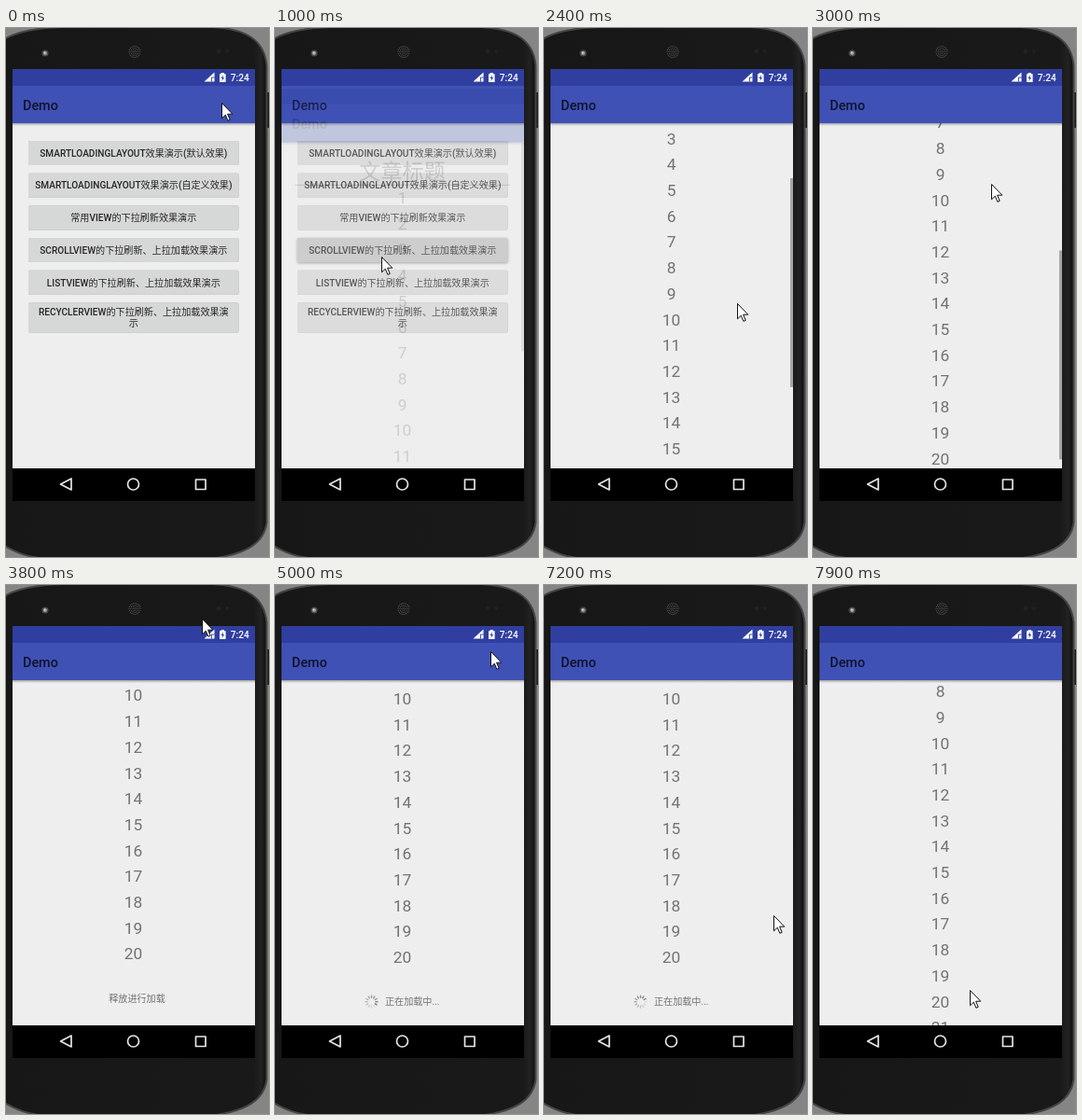
Recreate the animation shown at these times as an HTML page. Size 282 by 567 pixels, loop 8 s.

```html
<!DOCTYPE html>
<html lang="zh-CN">
<head>
<meta charset="utf-8">
<title>Demo</title>
<style>
html, body { margin: 0; width: 100%; height: 100%; overflow: hidden; background: #858585; }
svg { display: block; width: 282px; height: 567px; }
text { font-family: Roboto, "Noto Sans CJK SC", "Noto Sans CJK", sans-serif; }
.mid { text-anchor: middle; }
.title { font-size: 14.4px; font-weight: 500; fill: #10132c; }
.button rect { fill: #d6d7d7; filter: drop-shadow(0 .8px .7px rgba(0,0,0,.32)); }
.button text { font-size: 10.1px; font-weight: 500; fill: #262626; }
.button.pressed rect { fill: #c2c3c3; filter: drop-shadow(0 1.8px 1.4px rgba(0,0,0,.4)); }
#rows text { font-size: 17.33px; fill: #727272; }
#footer text { font-size: 10.1px; fill: #727272; }
#heading { font-size: 23.1px; fill: #727272; }
.nav { fill: none; stroke: #e6e6e6; stroke-width: 1.7; stroke-linejoin: round; }
</style>
</head>
<body>
<svg viewBox="0 0 282 567">
  <defs>
    <linearGradient id="shade" x2="0" y2="1">
      <stop offset="0" stop-opacity=".32"/><stop offset="1" stop-opacity="0"/>
    </linearGradient>
    <linearGradient id="body">
      <stop offset="0" stop-color="#171717"/><stop offset=".95" stop-color="#191919"/>
      <stop offset=".98" stop-color="#222"/><stop offset="1" stop-color="#0c0c0c"/>
    </linearGradient>
    <clipPath id="screen"><rect x="7" y="44" width="260" height="428"/></clipPath>
    <clipPath id="view"><rect x="7" y="102" width="260" height="370"/></clipPath>
    <g id="bars">
      <rect x="7" y="44" width="260" height="428" fill="#eee"/>
      <rect x="7" y="44" width="260" height="18" fill="#303f9f"/>
      <rect x="7" y="62" width="260" height="40" fill="#3f51b5"/>
      <text class="title" x="18" y="87.6">Demo</text>
    </g>
    <rect id="shadow" x="7" y="102" width="260" height="3" fill="url(#shade)"/>
  </defs>

  <rect width="282" height="567" fill="#858585"/>
  <rect x="280" y="69" width="3" height="38" fill="#1c1c1c"/>
  <path d="M-3 13C10 4 30 0 60-1H222C256 1 277 12 279.5 40V530C277 552 258 563 225 568H35C20 566 8 561-3 554Z"
        fill="url(#body)" stroke="#454545" stroke-width="2"/>
  <g id="speaker" fill="#5c5c5c"></g>
  <circle cx="42" cy="27" r="3.6" fill="#4b4b4b"/>
  <circle cx="42" cy="27" r="2" fill="#9a9a9a"/>
  <circle cx="41.5" cy="26.5" r="1" fill="#d4d4d4"/>
  <circle cx="228" cy="25" r="2.5" fill="#222"/>
  <circle cx="237" cy="25" r="2" fill="#222"/>

  <g clip-path="url(#screen)">
    <g id="home"><use href="#bars"/><use href="#shadow"/></g>
    <g id="page">
      <use href="#bars"/>
      <g clip-path="url(#view)">
        <g id="list">
          <text id="heading" class="mid" x="136.5" y="141.2">文章标题</text>
          <rect x="21" y="147" width="231" height="1" fill="#777"/>
          <g id="rows" class="mid"></g>
          <g id="footer">
            <text id="hint" class="mid" x="140.5" y="738.8"></text>
            <g id="loading">
              <g id="spinner" stroke="#666" stroke-width="1.3"></g>
              <text x="118" y="738.8">正在加载中...</text>
            </g>
          </g>
        </g>
      </g>
      <rect id="thumb" x="264" width="3" height="224" fill="#a6a6a6"/>
      <use href="#shadow"/>
    </g>
  </g>

  <path d="M212.5 57.5H223.5V47.5Z" fill="#fff"/>
  <path d="M220.5 57.5V53H223.5" fill="none" stroke="#303f9f" stroke-width=".9"/>
  <path d="M229 49.2H230.7V48H233.8V49.2H235.6V58H229Z" fill="#fff"/>
  <path d="M232.8 50.2L230.6 54H232L231.6 57L234 53H232.6Z" fill="#303f9f"/>
  <text x="240.8" y="56.8" font-size="10.1" font-weight="500" fill="#fff">7:24</text>

  <rect x="7" y="472" width="260" height="35"/>
  <path class="nav" d="M70 483V495L58.500 489Z"/>
  <circle class="nav" cx="136.500" cy="489" r="6"/>
  <rect class="nav" x="203.500" y="484" width="10.500" height="10.500"/>

  <path id="cursor" d="M.5.5V16.800L4.300 13.200L6.900 19.300L9.200 18.300L6.600 12.200H11.800Z" fill="#fff" stroke="#111"/>
</svg>
<script>
const LOOP = 8000, STEP = 100;
const MAX_SCROLL = 241, ROW = 27.7, FOOTER = 47.5;
const DRAG_FROM = 393, RESIST = 0.44;
const OPEN = 1000, RELEASE = 4700, LOADED = 7600;

// time, x, y of the pointer
const path = [
  [0, 231, 80], [100, 170, 165], [200, 114, 246], [300, 114, 246], [400, 114, 245],
  [1000, 114, 245], [1200, 150, 252], [1600, 225, 298], [1800, 218, 393], [1900, 218, 393],
  [2400, 207, 295], [2800, 194, 187], [3000, 191, 167], [3300, 196, 120], [3700, 207, 50],
  [3800, 210, 36], [4300, 209, 2], [4600, 209, 2], [5000, 231, 71], [5500, 258, 358],
  [5800, 260, 370], [6200, 252, 350], [6500, 252, 349], [7300, 245, 355], [7900, 168, 434]
];

const $ = id => document.getElementById(id);
const clamp = (v, lo = 0, hi = 1) => Math.min(hi, Math.max(lo, v));

function add(parent, tag, attrs, label) {
  const el = document.createElementNS("http://www.w3.org/2000/svg", tag);
  for (const k in attrs) el.setAttribute(k, attrs[k]);
  if (label) el.textContent = label;
  return parent.appendChild(el);
}

function addButton(y, h, ...lines) {
  const g = add($("home"), "g", { class: "button mid" });
  add(g, "rect", { x: 24, y, width: 225.500, height: h, rx: 1.500 });
  lines.forEach((line, i) => {
    const mid = y + h / 2 + (i - (lines.length - 1) / 2) * 11.8;
    add(g, "text", { x: 136.800, y: mid + 3.700 }, line);
  });
  return g;
}

addButton(121, 26, "SMARTLOADINGLAYOUT效果演示(默认效果)");
addButton(155.700, 26, "SMARTLOADINGLAYOUT效果演示(自定义效果)");
addButton(190.400, 26, "常用VIEW的下拉刷新效果演示");
const target = addButton(225.100, 26, "SCROLLVIEW的下拉刷新、上拉加载效果演示");
addButton(259.800, 26, "LISTVIEW的下拉刷新、上拉加载效果演示");
addButton(294.500, 32, "RECYCLERVIEW的下拉刷新、上拉加载效果演", "示");

const rows = [];
for (let n = 1; n <= 22; n++)
  rows.push(add($("rows"), "text", { x: 136.500, y: 161 + (n - 1) * ROW + 6.200 }, n));

for (let i = 0; i < 12; i++)
  add($("spinner"), "path", { d: "M0-3.8V-7", transform: `rotate(${i * 30})`, opacity: 0.12 + 0.07 * i });

for (let r = 0; r < 4; r++)
  for (let i = 0, n = r * 6 || 1; i < n; i++) {
    const a = i / n * Math.PI * 2;
    add($("speaker"), "circle", { cx: 138 + r * 2 * Math.cos(a), cy: 25.500 + r * 2 * Math.sin(a), r: 0.600 });
  }

function pointerAt(t) {
  const i = path.findIndex(p => p[0] >= t);
  if (i <= 0) return path[0].slice(1);
  const a = path[i - 1], b = path[i], f = (t - a[0]) / (b[0] - a[0]);
  return [1, 2].map(k => Math.round(a[k] + (b[k] - a[k]) * f));
}

function pullAt(t, y) {
  if (t < 2000 || t >= LOADED) return 0;
  const drag = Math.max(0, (DRAG_FROM - MAX_SCROLL - y) * RESIST);
  if (t < RELEASE) return drag;
  return FOOTER + 18.500 * (1 - clamp((t - RELEASE + STEP) / 400)) ** 2;
}

function draw(t) {
  const [x, y] = pointerAt(t);
  $("cursor").setAttribute("transform", `translate(${x} ${y})`);
  target.classList.toggle("pressed", t >= 700);

  const open = clamp((t - OPEN + STEP) / 400);
  $("page").setAttribute("opacity", t < OPEN ? 0 : open);
  $("page").setAttribute("transform", `translate(0 ${37 * (1 - open) ** 2})`);

  const scroll = t < 2000 ? 0 : t < RELEASE ? clamp(DRAG_FROM - y, 0, MAX_SCROLL) : MAX_SCROLL;
  const pull = pullAt(t, y);
  $("list").setAttribute("transform", `translate(0 ${-scroll - pull})`);
  $("thumb").setAttribute("y", 101.500 + scroll * 0.606);
  $("thumb").setAttribute("opacity", clamp((3700 - t) / 300));

  const loading = t >= RELEASE, done = t >= LOADED;
  $("footer").style.display = done ? "none" : "";
  $("loading").style.display = loading ? "" : "none";
  $("hint").textContent = loading ? "" : pull > FOOTER ? "释放进行加载" : "上拉进行加载";
  $("spinner").setAttribute("transform", `translate(103.5 735.2) rotate(${(t - 5000) / 100 * 30 + 150})`);
  rows.slice(20).forEach(r => r.style.display = done ? "" : "none");
}

const start = performance.now();
function tick() {
  const t = (performance.now() - start) % LOOP;
  draw(Math.floor(t / STEP) * STEP);
  requestAnimationFrame(tick);
}
tick();
</script>
</body>
</html>
```
